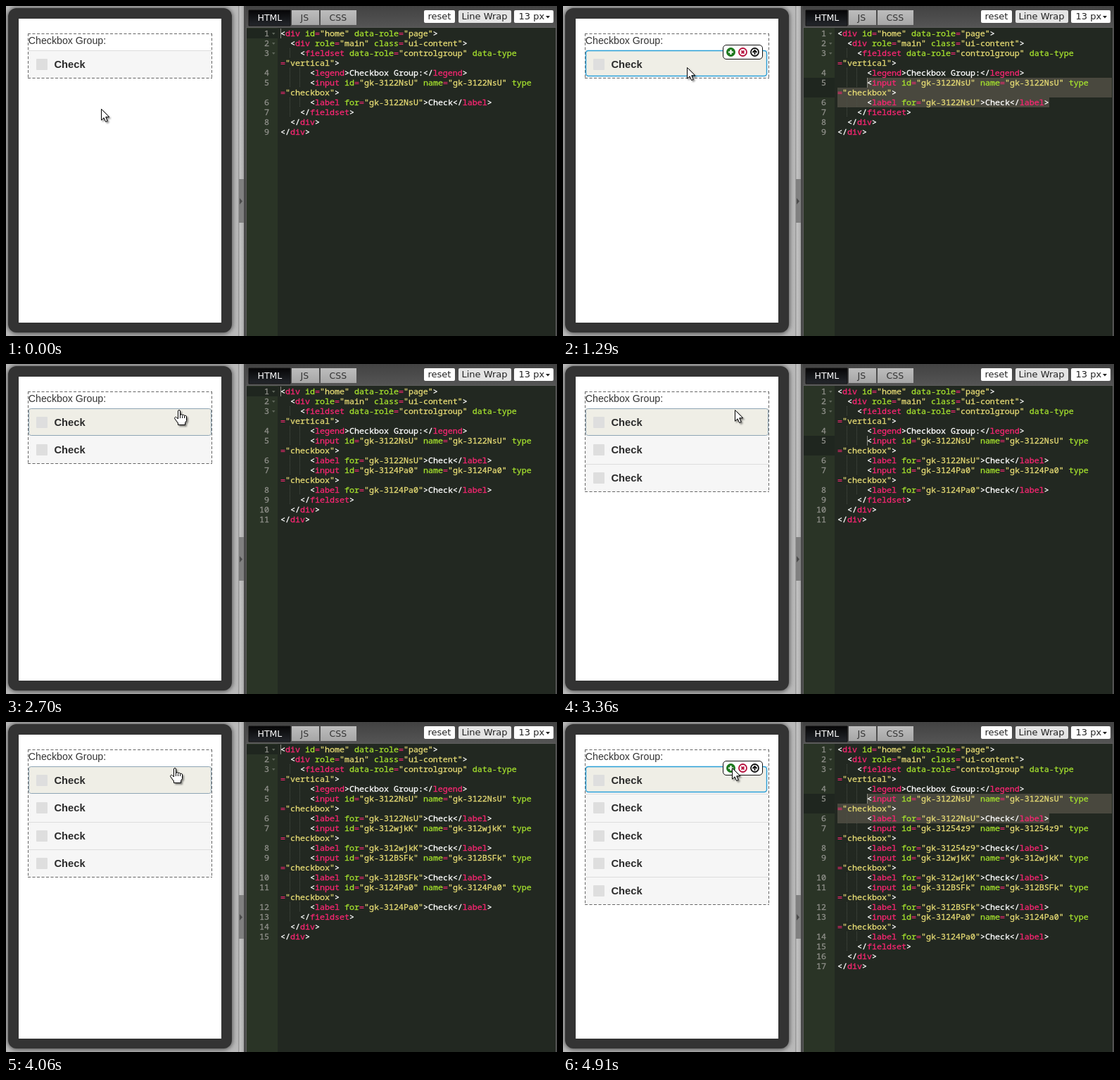
Recreate the animation shown at these times as an HTML page. Size 783 by 469 pixels, loop 6.11 s.

```html
<!DOCTYPE html>
<html lang="en">
<head>
<meta charset="utf-8">
<title>Checkbox group editor</title>
<style>
html, body { margin: 0; width: 100%; height: 100%; overflow: hidden; background: #222821; }
svg { display: block; }
text { white-space: pre; }
.ui { font: 13px "DejaVu Sans", sans-serif; fill: #222; }
.tab { font-size: 12.5px; fill: #333; }
.on { fill: #fff; }
.legend { font: 14.2px "Liberation Sans", sans-serif; fill: #333; }
.item { font: bold 14.7px "Liberation Sans", sans-serif; fill: #2b2b2b; }
.code { font: 11.667px "Noto Sans Mono", monospace; color: #fff; }
.code text, .code tspan { fill: currentColor; stroke: currentColor; stroke-width: .3; }
.code .num { color: #8f908a; text-anchor: end; }
.tag { color: #f92672; }
.attr { color: #a6e22e; }
.str { color: #e6db74; }
</style>
</head>
<body>
<svg id="stage" width="783" height="469" viewBox="0 0 783 469">
  <defs>
    <linearGradient id="bar" x2="0" y2="1"><stop stop-color="#424242"/><stop offset="1" stop-color="#555"/></linearGradient>
    <linearGradient id="tabOn" x2="0" y2="1"><stop stop-color="#050506"/><stop offset="1" stop-color="#24272c"/></linearGradient>
    <linearGradient id="tabOff" x2="0" y2="1"><stop stop-color="#bdbdbd"/><stop offset="1" stop-color="#a6a6a6"/></linearGradient>
    <linearGradient id="split"><stop stop-color="#8f8f8f"/><stop offset=".3" stop-color="#c4c4c4"/><stop offset="1" stop-color="#a5a5a5"/></linearGradient>
    <filter id="soft" x="-20%" y="-20%" width="140%" height="140%"><feGaussianBlur stdDeviation="3"/></filter>
    <filter id="drop" x="-50%" y="-50%" width="220%" height="220%"><feDropShadow dx="2" dy="2" stdDeviation="1" flood-opacity=".45"/></filter>
  </defs>

  <!-- device -->
  <rect width="331" height="469" fill="#b9b9b9"/>
  <rect x="2" y="2" width="320" height="464" rx="14" fill="#555" filter="url(#soft)"/>
  <rect x="3" y="3" width="318" height="461" rx="12" fill="#333"/>
  <rect x="18" y="18" width="288" height="432" fill="#fff"/>
  <g id="page"></g>

  <!-- splitter -->
  <rect x="330" width="9" height="469" fill="url(#split)"/>
  <rect x="331" y="246" width="7" height="62" fill="#808080"/>
  <path d="M332 273l4 4.5-4 4.5z" fill="#4c4c4c"/>
  <rect x="338" width="445" height="469" fill="#4a4a4a"/>

  <!-- toolbar -->
  <rect x="341" width="442" height="31" fill="url(#bar)"/>
  <g class="ui">
    <path d="M345 28v-22h59v22z" fill="url(#tabOn)" stroke="#111"/>
    <path d="M406 27v-21h39v21z M447 27v-21h51v21z" fill="url(#tabOff)"/>
    <text class="tab on" x="357.5" y="21">HTML</text>
    <text class="tab" x="418.5" y="21">JS</text>
    <text class="tab" x="459.5" y="21">CSS</text>
    <rect x="594" y="6" width="44" height="18" rx="2" fill="#fff"/>
    <rect x="643" y="6" width="75" height="18" rx="2" fill="#e4e4e4"/>
    <rect x="722" y="6" width="56" height="18" rx="2" fill="#fff"/>
    <text x="599.5" y="19">reset</text>
    <text x="647.5" y="19">Line Wrap</text>
    <text x="728.5" y="19">13 px</text>
    <path d="M767 14h6l-3 3.5z"/>
  </g>

  <!-- editor -->
  <rect x="341.5" y="30.5" width="440" height="440" fill="#222821" stroke="#5c5c5c"/>
  <rect x="342" y="31" width="44" height="438" fill="#2a3426"/>
  <g id="editor" class="code"></g>

  <g id="arrow" filter="url(#drop)">
    <path d="M.5.5V16.2L4.1 12.8 6.6 18.5 9.2 17.4 6.7 11.8H11.7Z" fill="#fff" stroke="#000"/>
  </g>
  <g id="hand" filter="url(#drop)">
    <path d="M-1.5 13V2Q-1.5.5 0 .5T1.5 2V8Q1.7 6.5 3.2 6.6T4.5 8Q5 7 6.2 7.2T7.5 8.8Q8 8 9.2 8.3T10.5 10V15.5L8.5 18.5V21.5H-1.5V19L-6 13Q-7 11.3-5.7 10.6T-3.3 11.2Z" fill="#fff" stroke="#000"/>
    <path d="M1.5 8v4M4.5 8.5v3.5M7.5 9v3" stroke="#000"/>
  </g>
</svg>
<script>
const $ = id => document.getElementById(id);
const LOOP = 6110, ROW = 39.25, CH = 7, LINE = 14;
const IDS = ["3122NsU", "31254z9", "312wjkK", "312BSFk", "3124Pa0"];

// Each entry overrides parts of the state from its time on.
const START = { boxes: 1, fields: 1, active: 1, mark: 0, tool: 0, over: "", focus: 0, hand: 0 };
const CLEARED = { active: 1, mark: 0, tool: 0, over: "label", focus: 1 };
const PICKED = { active: 5, mark: 1, tool: 1, over: "label", focus: 0, hand: 0 };
const CUES = [
  [640, { over: "label" }],
  [1160, { tool: 1 }],
  [1290, PICKED],
  [1910, { over: "plus" }],
  [1980, { hand: 1 }],
  [2700, { ...CLEARED, boxes: 2, fields: 2 }],
  [2830, PICKED],
  [3230, { over: "plus" }],
  [3360, { ...CLEARED, boxes: 3, active: 5 }],
  [3420, { fields: 3, active: 1 }],
  [3480, PICKED],
  [3610, { over: "plus" }],
  [3730, { hand: 1 }],
  [4060, { ...CLEARED, boxes: 4, fields: 4 }],
  [4190, PICKED],
  [4650, { over: "plus" }],
  [4850, { ...CLEARED, boxes: 5, fields: 5 }],
  [4910, PICKED]
];

// Pointer moves: first step, last step, number of steps, end point.
const MOVES = [
  [460, 760, 6, 176, 87],
  [1490, 1980, 8, 240, 65],
  [2110, 2170, 2, 246, 65],
  [2830, 2830, 1, 244, 65],
  [3540, 3730, 3, 240, 65]
];

function pointer(t) {
  let x = 135, y = 146;
  for (const [a, b, n, tx, ty] of MOVES) {
    if (t < a) break;
    const step = n > 1 ? Math.floor((t - a) / ((b - a) / (n - 1)) + 1e-6) + 1 : 1;
    const p = Math.min(1, step / n), e = p * p * (3 - 2 * p);
    x += (tx - x) * e;
    y += (ty - y) * e;
  }
  return [Math.round(x), Math.round(y)];
}

const rect = (x, y, w, h, fill, more = "") =>
  `<rect x="${x}" y="${y}" width="${w}" height="${h}" fill="${fill}" ${more}/>`;
const esc = s => s.replace(/&/g, "&amp;").replace(/</g, "&lt;").replace(/>/g, "&gt;");

function drawTools(hot) {
  const ring = (x, c) => `<circle cx="${x}" cy="65.5" r="5.5" fill="#fff" stroke="${c}" stroke-width="1.8"/>`;
  return rect(227.5, 55.5, 56, 20, "#fff", 'rx="4.5" stroke="#111"') +
    `<circle cx="238.5" cy="65.5" r="6.5" fill="${hot ? "#35a02c" : "#1c781c"}"/>` +
    '<path d="M238.5 62v7M235 65.5h7" stroke="#fff" stroke-width="2.2"/>' +
    ring(255.5, "#b5103c") + '<path d="M253.5 63.5l4 4m0-4l-4 4" stroke="#b5103c" stroke-width="1.8"/>' +
    ring(272.5, "#111") + '<path d="M272.5 69v-6m-3 3l3-3 3 3" fill="none" stroke="#111" stroke-width="1.8"/>';
}

function drawPage(s) {
  const bottom = Math.round(63.9 + ROW * s.boxes);
  let out = rect(32, 63, 260, bottom - 63, "#f6f6f6");
  if (s.over === "label") out += rect(32, 63, s.tool ? 258 : 260, s.tool ? 37 : 38, "#efeee6", 'rx="3"');
  for (let i = 0; i < s.boxes; i++) {
    const y = Math.round(83 + ROW * i);
    if (!s.focus || i > 1) out += rect(32, y - 20, 260, 1, "#ddd");
    out += rect(43, y - 8, 16, 16, "#dedede", 'rx="1"') + `<text class="item" x="68.5" y="${y + 5}">Check</text>`;
  }
  out += '<text class="legend" x="31.8" y="54">Checkbox Group:</text>';
  out += `<path d="M31 39.5h262M31 ${bottom - 0.5}h262M31.5 39v${bottom - 39}M292.5 39v${bottom - 39}" stroke="#666" stroke-dasharray="4 2.5"/>`;
  if (s.focus) out += rect(32.5, 63.5, 259, 38, "none", 'rx="3" stroke="#8ea5b5"');
  if (s.tool) out += rect(32.5, 63.5, 257, 36, "none", 'rx="3.5" stroke="#2a9fd8" stroke-width="1.4"') + drawTools(s.over === "plus");
  return out;
}

// Lines of [indent, first row, wrapped row].
function source(n) {
  const ids = [IDS[0], ...IDS.slice(IDS.length - n + 1)].slice(0, n);
  return [
    [0, '<div id="home" data-role="page">'],
    [1, '<div role="main" class="ui-content">'],
    [2, '<fieldset data-role="controlgroup" data-type', '="vertical">'],
    [3, "<legend>Checkbox Group:</legend>"],
    ...ids.flatMap(id => [
      [3, `<input id="gk-${id}" name="gk-${id}" type`, '="checkbox">'],
      [3, `<label for="gk-${id}">Check</label>`]
    ]),
    [2, "</fieldset>"], [1, "</div>"], [0, "</div>"]
  ];
}

function paint(row) {
  const span = (c, s) => `<tspan class="${c}">${esc(s)}</tspan>`;
  return row.replace(/(<\/?)([a-z]+)|("[^"]*")|(=)|( [a-z-]+(?==|$))|[<>&]/g, (m, open, tag, str, eq, attr) =>
    tag ? esc(open) + span("tag", tag) : str ? span("str", str) : eq ? span("tag", eq) : attr ? span("attr", attr) : esc(m));
}

function drawEditor(s) {
  let back = "", text = "", y = 32;
  if (s.mark) back += rect(432, 102, 348, LINE, "#49483e") + rect(390, 116, 390, LINE, "#49483e") + rect(390, 130, 301, LINE, "#49483e");
  source(s.fields).forEach(([indent, ...rows], i) => {
    const x = 390 + indent * 2 * CH;
    if (i + 1 === s.active) {
      back += rect(342, y, 44, LINE * rows.length, "#1f261f") + rect(x, y, 1, LINE, "#8b8b82");
    }
    for (let k = 1; k < indent; k++) {
      back += `<path d="M${389.5 + k * 2 * CH} ${y}v14" stroke="#4a5047" stroke-dasharray="1 1"/>`;
    }
    text += `<text class="num" x="374" y="${y + 11}">${i + 1}</text>`;
    if (i < 3) text += `<path d="M378 ${y + 6}h4.5l-2.25 3z" fill="#5f665b"/>`;
    rows.forEach((row, k) => {
      text += `<text x="${k ? 390 : x}" y="${y + 11}">${paint(row)}</text>`;
      y += LINE;
    });
  });
  return back + text;
}

let shown = "";
function render(t) {
  const s = { ...START };
  for (const [at, change] of CUES) if (t >= at) Object.assign(s, change);
  const key = JSON.stringify(s);
  if (key !== shown) {
    shown = key;
    $("page").innerHTML = drawPage(s);
    $("editor").innerHTML = drawEditor(s);
    $("hand").style.display = s.hand ? "" : "none";
    $("arrow").style.display = s.hand ? "none" : "";
  }
  const place = `translate(${pointer(t)})`;
  $("arrow").setAttribute("transform", place);
  $("hand").setAttribute("transform", place);
}

const begin = performance.now();
function tick() {
  render((performance.now() - begin) % LOOP);
  requestAnimationFrame(tick);
}
tick();
</script>
</body>
</html>
```
